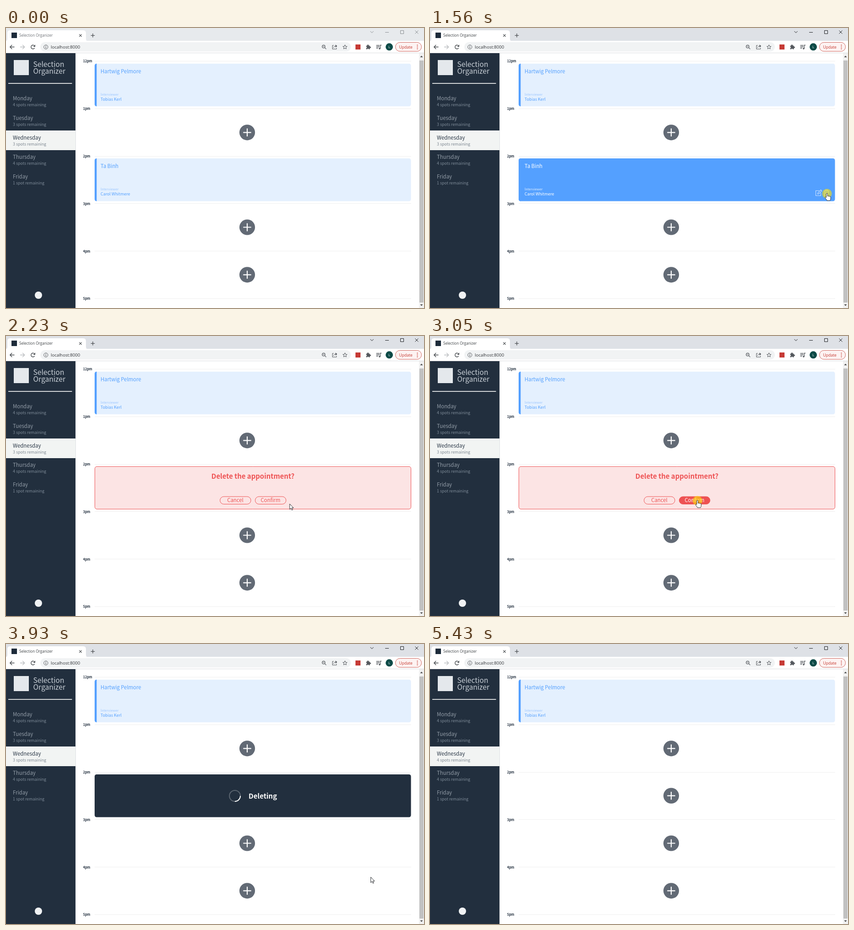
Write an HTML page with a canvas that moves like this. It is 915 px wide and 612 px high and loops after 6560 ms.

```html
<!DOCTYPE html>
<html lang="en">
<head>
<meta charset="utf-8">
<title>Selection Organizer</title>
<style>
  html, body { margin: 0; width: 100%; height: 100%; overflow: hidden; background: #fff; }
  canvas { display: block; width: 915px; height: 612px; }
</style>
</head>
<body>
<canvas id="stage" width="915" height="612"></canvas>
<script>
const ctx = document.getElementById('stage').getContext('2d');
const LOOP = 6560;
const PAGE = '"Noto Sans CJK JP", "Noto Sans CJK SC", "Noto Sans CJK", "Noto Sans", sans-serif';
const UI = '"Open Sans", "Noto Sans", sans-serif';
const NAVY = '#222f3e', BLUE = '#54a0ff', RED = '#ee5253', ICON = '#54585d';
const ROW = 103.8;

// Pointer moves: start, step length, number of steps, evenly timed waypoints
const MOVES = [
  [170, 70, 10, [[889, 598], [868, 480], [855, 367], [861, 337]]],
  [870, 85, 8, [[863, 342], [868, 356], [870, 362], [869, 361.5]]],
  [1810, 70, 10, [[862, 364], [745, 366], [621, 367], [587, 360]]],
  [2640, 70, 3, [[588, 361], [585.5, 359.5]]],
  [3180, 69, 8, [[592, 362], [660, 385], [757, 400], [798.5, 509.5]]],
  [5150, 70, 5, [[808, 509], [930, 502]]]
];

const ARROW = new Path2D('M0 0V12L2.8 9.4L4.7 13.6L6.6 12.8L4.7 8.7H8.4Z');
const HAND = new Path2D('M-1.6 9V1.2a1.5 1.5 0 0 1 3 0V6.2a1.3 1.3 0 0 1 2.4 .3a1.3 1.3 0 0 1 2.3 .4' +
  'a1.2 1.2 0 0 1 2 .9V11.5c0 2-1 2.8-1.3 4.2H0C-.6 13.7-3 11.6-4 9.6c-.6-1.4 1-2.2 2.4-.6z');

function pointer(t) {
  const move = MOVES.filter(m => m[0] <= t).pop();
  if (!move) return null;
  const [start, step, n, pts] = move;
  const u = Math.min(1, Math.floor((t - start) / step) / (n - 1)) * (pts.length - 1);
  const i = Math.min(pts.length - 2, Math.floor(u));
  const mix = k => pts[i][k] + (pts[i + 1][k] - pts[i][k]) * (u - i);
  return { x: mix(0), y: mix(1) };
}

function rect(x, y, w, h, color) {
  ctx.fillStyle = color;
  ctx.fillRect(x, y, w, h);
}

function round(x, y, w, h, r, fill, line, width = 1) {
  ctx.beginPath();
  ctx.roundRect(x, y, w, h, r);
  if (fill) { ctx.fillStyle = fill; ctx.fill(); }
  if (line) { ctx.strokeStyle = line; ctx.lineWidth = width; ctx.stroke(); }
}

function disc(x, y, r, color) {
  ctx.beginPath();
  ctx.arc(x, y, r, 0, Math.PI * 2);
  ctx.fillStyle = color;
  ctx.fill();
}

function arc(x, y, r, from, to, color, width) {
  ctx.beginPath();
  ctx.arc(x, y, r, from, to);
  ctx.strokeStyle = color;
  ctx.lineWidth = width;
  ctx.stroke();
}

function stroke(d, color, width = 1.2, x = 0, y = 0) {
  ctx.save();
  ctx.translate(x, y);
  ctx.strokeStyle = color;
  ctx.lineWidth = width;
  ctx.stroke(new Path2D(d));
  ctx.restore();
}

function fill(d, color, x = 0, y = 0) {
  ctx.save();
  ctx.translate(x, y);
  ctx.fillStyle = color;
  ctx.fill(new Path2D(d));
  ctx.restore();
}

function text(s, x, y, size, color, weight = 400, family = PAGE, align = 'left') {
  ctx.font = `${weight} ${size}px ${family}`;
  ctx.textAlign = align;
  ctx.fillStyle = color;
  ctx.fillText(s, x, y);
}

function tabStrip(active) {
  const ink = active ? '#1f2124' : '#8c9094';
  rect(0, 0, 915, 29, active ? '#dee1e6' : '#e7eaed');
  fill('M-2 29Q3 29 3 23V11Q3 5 9 5H169Q175 5 175 11V23Q175 29 180 29Z', '#fff');
  rect(12, 10, 12, 12, '#1d2b3a');
  text('Selection Organizer', 29, 19.3, 8.1, active ? '#3c4043' : '#6b6f74', 400, UI);
  stroke('M-2.7 -2.7L2.7 2.7M2.7 -2.7L-2.7 2.7', '#4a4e52', 1.1, 163, 16.3);
  stroke('M-4.3 0H4.3M0 -4.3V4.3', '#4a4e52', 1.3, 190, 16.3);
  stroke('M797.5 7L801 10.5L804.5 7M830 9.5H838M863.5 5.5H870.5V12.5H863.5Z' +
    'M895.5 5.5L902.5 12.5M902.5 5.5L895.5 12.5', ink, 1);
}

function toolbar() {
  rect(0, 28, 915, 27, '#fff');
  rect(0, 54, 915, 1, '#dcdee1');
  const back = 'M5 0H-4.5M-.2 -4.5L-4.7 0L-.2 4.5';
  stroke(back, '#4a4e52', 1.4, 13.5, 41.5);
  ctx.save();
  ctx.scale(-1, 1);
  stroke(back, '#b9bcbf', 1.3, -36, 41.5);
  ctx.restore();
  arc(59, 41.5, 4.2, .5, 5.3, '#4a4e52', 1.4);
  fill('M64 36.3V41H59.3Z', '#4a4e52');

  round(75, 31, 680, 20.5, 10.2, '#f1f3f4');
  arc(87.3, 41.5, 4.5, 0, 7, ICON, 1);
  rect(86.7, 40.7, 1.2, 3.3, ICON);
  rect(86.7, 38.7, 1.2, 1.2, ICON);
  text('localhost:8000', 98, 44.8, 9.5, '#303337', 400, UI);

  arc(695.3, 40.5, 3.2, 0, 7, ICON, 1.2);
  stroke('M697.6 42.8L701 46.2M693.7 40.5H696.9', ICON);
  stroke('M717.5 38H714.5V46H723.5V43.5M717 43.5C717.3 40.5 719 39.5 722 39.5', ICON, 1);
  fill('M721.3 36.3L725 39.6L721.3 42.8Z', ICON);
  let star = '';
  for (let i = 0; i < 10; i++) {
    const r = i % 2 ? 2.2 : 5, a = i * Math.PI / 5;
    star += (i ? 'L' : 'M') + r * Math.sin(a) + ' ' + -r * Math.cos(a);
  }
  stroke(star + 'Z', ICON, 1, 742, 41.8);
  rect(765, 36, 11, 11, '#c63a35');
  round(788.5, 38.5, 8, 8, 1, ICON);
  disc(792.3, 38, 1.8, ICON);
  disc(797, 42.3, 1.8, ICON);
  disc(788.7, 42.5, 1.3, '#fff');
  disc(792.5, 46.3, 1.3, '#fff');
  stroke('M810.5 38H817.5M810.5 41H817.5M810.5 44H814.5M819.3 45V37.5H822', ICON, 1.3);
  disc(817.8, 45, 1.8, ICON);
  disc(839, 41.3, 8, '#0c4a47');
  text('L', 839, 44, 7.5, '#fff', 400, UI, 'center');
  round(852.5, 31.5, 57, 19.5, 9.7, '#fdf3f2', '#cf675f');
  text('Update', 860.5, 44.5, 8.6, '#c5392f', 400, UI);
  for (const y of [37.5, 41.5, 45.5]) disc(900.5, y, 1.1, '#c5392f');
}

function sidebar(wednesday) {
  rect(0, 55, 152, 557, NAVY);
  rect(152, 55, 1, 557, '#dfe1e4');
  rect(17, 70, 33, 33, '#e4e8ec');
  text('Selection', 59.5, 84.8, 15.6, '#c9d0d7', 300);
  text('Organizer', 59.5, 100, 15.6, '#c9d0d7', 300);
  rect(5, 120.3, 139.5, 1.6, '#fff');
  const days = [['Monday', 4], ['Tuesday', 3], ['Wednesday', wednesday], ['Thursday', 4], ['Friday', 1]];
  days.forEach(([day, spots], i) => {
    const y = 158.2 + i * 42.7, on = i === 2;
    if (on) rect(0, 224, 152, 43, '#f2f4f3');
    text(day, 15, y, 11.4, on ? '#2c3948' : '#929ca7');
    text(`${spots} spot${spots > 1 ? 's' : ''} remaining`, 15, y + 13, 8.85, on ? '#7d8791' : '#7f8c99', 300);
  });
  disc(71, 584, 8, '#f0f2f3');
}

function plus(y) {
  disc(528, y, 17.1, '#626a75');
  stroke('M-8.7 0H8.7M0 -8.7V8.7', '#fff', 2.2, 528, y);
}

function card(y, name, interviewer, hover) {
  ctx.save();
  ctx.beginPath();
  ctx.roundRect(194, y, 692.5, 93.5, 4.5);
  ctx.clip();
  rect(194, y, 693, 94, hover ? BLUE : '#e4f0fe');
  rect(194, y, 4.5, 94, BLUE);
  ctx.restore();
  const ink = hover ? '#fff' : BLUE;
  text(name, 207, y + 21.4, 11.35, ink);
  text('Interviewer', 207, y + 70, 7.4, hover ? '#e2efff' : '#9cc6fd', 300);
  text(interviewer, 207, y + 81.3, 8.95, ink);
  if (!hover) return;
  const tint = '#c9e0ff';
  stroke('M852 355.5H844.5V366.5H855.5V360.5M848.5 363L849.3 360L855.5 353.8L857.7 356L851.5 362.2Z', tint, 1.1);
  stroke('M862.5 356H873.5M866 355.7V354H870V355.7M863.7 356.3V366.5H872.3V356.3' +
    'M866.3 358.5V364M868 358.5V364M869.7 358.5V364', tint, 1.1);
}

function button(x, label, filled) {
  round(x + .5, 351, 67.5, 16.5, 8.2, filled ? RED : null, RED);
  text(label, x + 34, 363.3, 11.4, filled ? '#fff' : RED, 400, PAGE, 'center');
}

function confirmBox(hover) {
  round(194.5, 285.3, 692, 93, 4.5, '#fce4e4', RED);
  text('Delete the appointment?', 540.5, 312.2, 14.9, RED, 600, PAGE, 'center');
  button(468, 'Cancel', false);
  button(545, 'Confirm', hover);
}

function deletingBox(t) {
  round(194, 285, 692.5, 93.5, 4.5, NAVY);
  const a = (t - 3930) / 1000 * Math.PI * 2;
  arc(501, 332, 12, 0, Math.PI * 2, '#5b6570', 2);
  arc(501, 332, 12, a, a + Math.PI / 2, '#fff', 2);
  text('Deleting', 531, 338.3, 15, '#fff', 600);
}

function scrollbar() {
  rect(904, 55, 11, 557, '#f1f1f1');
  rect(905, 71, 9, 529, '#c1c1c1');
  fill('M906.5 64L909.5 60.5L912.5 64Z', '#505050');
  fill('M906.5 604L909.5 607.5L912.5 604Z', '#505050');
}

function drawPointer(p, hand, click) {
  if (click) disc(p.x, p.y + .5, 10.5, 'rgba(255,225,0,.58)');
  ctx.save();
  ctx.translate(p.x, p.y);
  const shape = hand ? HAND : ARROW;
  ctx.fillStyle = '#fff';
  ctx.fill(shape);
  ctx.strokeStyle = '#15181c';
  ctx.lineWidth = .9;
  ctx.lineJoin = 'round';
  ctx.stroke(shape);
  ctx.restore();
}

function draw(t) {
  const p = pointer(t);
  const inside = (x0, y0, x1, y1) => !!p && p.x >= x0 && p.x <= x1 && p.y >= y0 && p.y <= y1;
  const state = t < 1610 ? 'card' : t < 3180 ? 'confirm' : t < 4550 ? 'deleting' : 'empty';
  const onTrash = state === 'card' && inside(862, 353, 874, 367.5);
  const onConfirm = state === 'confirm' && inside(545, 351, 613, 367.5);

  rect(0, 0, 915, 612, '#fff');
  tabStrip(t >= 1560);
  toolbar();
  sidebar(state === 'empty' ? 4 : 3);

  ['12pm', '1pm', '2pm', '3pm', '4pm', '5pm'].forEach((hour, i) => {
    const y = 72.5 + i * ROW;
    rect(194, Math.round(y - .5), 693, 1, '#efefef');
    text(hour, 168.7, y + 2.9, 7.2, NAVY, 700);
  });
  card(77.7, 'Hartwig Pelmore', 'Tobias Kerl', false);
  for (const y of [228.3, 435.5, 539.3]) plus(y);
  if (state === 'card') card(285, 'Ta Binh', 'Carol Whitmere', inside(194, 285, 887, 379));
  else if (state === 'confirm') confirmBox(onConfirm);
  else if (state === 'deleting') deletingBox(t);
  else plus(331.6);

  scrollbar();
  const click = (t >= 1560 && t < 1610) || (t >= 3050 && t < 3180);
  if (p) drawPointer(p, onTrash || onConfirm, click);
}

const begin = performance.now();
function tick() {
  draw((performance.now() - begin) % LOOP);
  requestAnimationFrame(tick);
}
tick();
</script>
</body>
</html>
```
